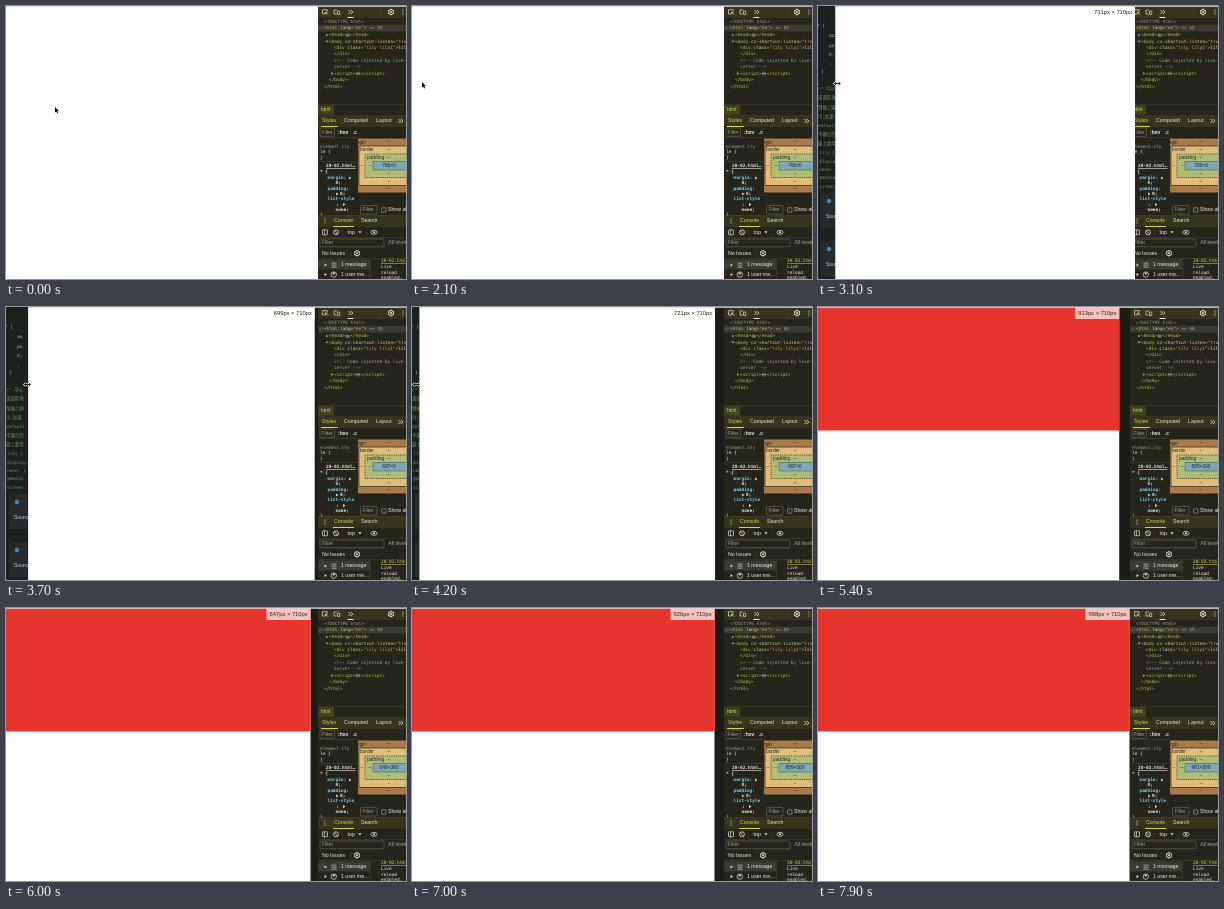
Animation of 400 by 273 pixels, one loop 8000 ms. Source, as an HTML page with a canvas:

```html
<!DOCTYPE html>
<html lang="en">
<head>
<meta charset="utf-8">
<title>Responsive resize</title>
<style>
html, body { margin: 0; width: 100%; height: 100%; overflow: hidden; background: #fff; }
canvas { display: block; width: 400px; height: 273px; }
</style>
</head>
<body>
<canvas id="stage"></canvas>
<script>
const W = 400, H = 273, LOOP = 8000, STEP = 100, SCALE = 0.41;
const canvas = document.getElementById('stage');
const ctx = canvas.getContext('2d');
const dpr = window.devicePixelRatio || 1;
canvas.width = W * dpr;
canvas.height = H * dpr;

const MONO = '"DejaVu Sans Mono", "Noto Sans CJK TC", "Noto Sans CJK", monospace';
const SANS = '"Liberation Sans", Arial, sans-serif';
const C = {
  panel: '#25251c', bar: '#34341f', line: '#46472f', box: '#65664c', row: '#3b3b31', text: '#eae9dc', dim: '#a09f8f',
  tag: '#b3c04f', attr: '#d2d58c', value: '#f0986a', prop: '#78cff0', accent: '#d2d84c'
};

// Key points: [time, value]
const PAGE_WIDTH = [[2800, 763], [3100, 731], [3500, 697], [3900, 701], [4200, 721], [4600, 768], [6000, 847], [7900, 998]];
const PAGE_RIGHT = [[2800, 312], [3100, 317], [3500, 311], [4200, 303], [4600, 304.5], [5700, 300], [6000, 304.5], [6400, 310],
  [6800, 300], [7200, 305], [7500, 302], [7900, 311.5]];
const POINTER_X = [[200, 49], [1000, 34], [2100, 10], [2700, 0]];
const POINTER_Y = [[200, 101], [1000, 90], [2100, 76], [2700, 77]];
const GRIP = [[3100, 2], [4200, -3]];
const BOX_SIZE = [[0, '766×0'], [3500, '697×0'], [4400, '760×0'], [4700, '768×300'], [5200, '805×300'],
  [5800, '846×300'], [6500, '889×300'], [7100, '935×300'], [7600, '981×300']];

function at(keys, t) {
  if (t <= keys[0][0]) return keys[0][1];
  for (let i = 1; i < keys.length; i++) {
    const [t0, a] = keys[i - 1], [t1, b] = keys[i];
    if (t <= t1) return a + (b - a) * (t - t0) / (t1 - t0);
  }
  return keys[keys.length - 1][1];
}

function latest(keys, t) {
  return keys.filter(k => k[0] <= t).pop()[1];
}

function rect(x, y, w, h, color) {
  ctx.fillStyle = color;
  ctx.fillRect(x, y, w, h);
}

function frame(x, y, w, h, color, r = 1) {
  ctx.strokeStyle = color;
  ctx.lineWidth = 0.7;
  ctx.beginPath();
  ctx.roundRect(x, y, w, h, r);
  ctx.stroke();
}

function path(points, color, width = 0.8) {
  ctx.strokeStyle = color;
  ctx.lineWidth = width;
  ctx.beginPath();
  points.forEach(([x, y], i) => i ? ctx.lineTo(x, y) : ctx.moveTo(x, y));
  ctx.stroke();
}

function ring(x, y, r, color, width = 0.8) {
  ctx.strokeStyle = color;
  ctx.lineWidth = width;
  ctx.beginPath();
  ctx.arc(x, y, r, 0, 7);
  ctx.stroke();
}

function dot(x, y, r, color) {
  ctx.fillStyle = color;
  ctx.beginPath();
  ctx.arc(x, y, r, 0, 7);
  ctx.fill();
}

// Vertically centred text; returns the x where it ends.
function write(str, x, y, color, font, align = 'left') {
  ctx.font = font;
  ctx.textAlign = align;
  ctx.textBaseline = 'middle';
  ctx.fillStyle = color;
  ctx.fillText(str, x, y);
  return x + ctx.measureText(str).width;
}

const ui = (str, x, y, color = C.text, size = 5.2, align) => write(str, x, y, color, size + 'px ' + SANS, align);
const code = (str, x, y, color = C.text) => write(str, x, y, color, '4.45px ' + MONO);
const bold = (str, x, y, color = C.text) => write(str, x, y, color, 'bold 4.45px ' + MONO);

function codeRow(x, y, ...parts) {
  for (const [str, color] of parts) x = code(str, x, y, color);
  return x;
}

// A collapsed element with a small pill between its tags.
function collapsed(name, x, y) {
  arrow(x - 2, y);
  const end = code(`<${name}>`, x, y, C.tag);
  ctx.fillStyle = '#55564a';
  ctx.beginPath();
  ctx.roundRect(end + 0.3, y - 1.7, 4.6, 3.6, 1.2);
  ctx.fill();
  for (const d of [1.4, 2.6, 3.8]) dot(end + d, y, 0.4, C.text);
  code(`</${name}>`, end + 5.3, y, C.tag);
}

function arrow(x, y, down, color = C.dim) {
  ctx.fillStyle = color;
  ctx.beginPath();
  if (down) { ctx.moveTo(x - 1.5, y - 1); ctx.lineTo(x + 1.5, y - 1); ctx.lineTo(x, y + 1.3); }
  else { ctx.moveTo(x - 0.9, y - 1.6); ctx.lineTo(x + 1.3, y); ctx.lineTo(x - 0.9, y + 1.6); }
  ctx.fill();
}

function gear(x, y) {
  ring(x, y, 2.5, C.text, 0.9);
  dot(x, y, 1, C.text);
  for (let i = 0; i < 6; i++) {
    const a = (i + 0.5) * Math.PI / 3, c = Math.cos(a), s = Math.sin(a);
    path([[x + c * 2.5, y + s * 2.5], [x + c * 3.3, y + s * 3.3]], C.text, 1);
  }
}

function chevrons(x, y) {
  for (const d of [0, 2.4]) path([[x + d, y - 2], [x + d + 2, y], [x + d, y + 2]], C.text);
}

function dots(x, y) {
  for (const d of [-2, 0, 2]) dot(x, y + d, 0.6, C.text);
}

function drawEditor() {
  rect(0, 0, 40, H, '#1b211f');
  const plain = '#9eb3a7', note = '#659350';
  code('r {', -1, 20, plain);
  ['ma', 'po', '0;', ':'].forEach((s, i) => code(s, 11, 30 + i * 9.5, plain));
  code('}', 3, 66, plain);
  ['/* 可以', '畫面區塊', '螢機上顯', '示,如果', 'default', '不顯示的', '最上要用']
    .forEach((s, i) => code(s, 0, 83 + i * 9.2, note));
  ['lily j', 'display:', 'none; }', '@media', 'screen'].forEach((s, i) => code(s, 1, 147 + i * 8.4, note));
  for (const y of [187, 235]) {
    rect(3, y, 40, 35, '#252b2c');
    dot(11, y + 8, 2.2, '#3c87c8');
    ui('Source', 8, y + 24, '#c0c8c8', 5);
  }
}

function drawElements() {
  rect(312, 0, 88, 12, C.bar);
  path([[319, 8], [316.5, 8], [316.5, 3.7], [321.3, 3.7], [321.3, 5]], C.text, 0.7);
  path([[322.3, 8.8], [319.5, 6], [319.5, 8.2]], C.text, 0.7);
  path([[319.5, 6], [321.7, 6]], C.text, 0.7);
  path([[331, 4], [328, 4], [328, 8], [330.5, 8]], C.text, 0.7);
  frame(331.5, 5, 2.2, 3.5, C.text, 0.3);
  chevrons(342.5, 6);
  rect(341.5, 11, 6, 1, C.text);
  rect(375.5, 2, 0.6, 8, C.line);
  gear(385, 6);
  dots(397, 6);

  rect(312, 18.8, 88, 6.6, C.row);
  const { tag, attr, value, dim, text } = C;
  code('<!DOCTYPE html>', 318, 15.5, dim);
  for (let i = 0; i < 3; i++) dot(313.3 + i * 1.4, 22, 0.4, dim);
  codeRow(318, 22, ['<html ', tag], ['lang', attr], ['="', tag], ['en', value], ['">', tag], [' == $0', dim]);
  collapsed('head', 323, 29);
  arrow(321, 35.5, true);
  codeRow(323, 35.5, ['<body ', tag], ['cz-shortcut-listen', attr], ['="', tag], ['true', value], ['">', tag]);
  codeRow(328, 42, ['<div ', tag], ['class', attr], ['="', tag], ['lily lily1', value], ['">', tag], ['lily', text]);
  code('</div>', 328, 48, tag);
  code('<!-- Code injected by live-', 328, 54.5, dim);
  code('server -->', 328, 61, dim);
  collapsed('script', 328, 67.5);
  code('</body>', 323, 74, tag);
  code('</html>', 318, 80.5, tag);

  rect(312, 98.5, 88, 0.6, C.line);
  rect(312, 99.3, 16, 9.4, '#414321');
  ui('html', 315, 104, C.accent, 5);
}

function drawBoxModel(size) {
  rect(352, 131, 48, 78, C.panel);
  rect(352, 132.5, 48, 54, '#a97b4b');
  rect(353, 140, 47, 39.5, '#e1bd79');
  rect(359, 148, 41, 23.5, '#b0bd76');
  rect(367, 155.5, 33, 8.5, '#7da8b6');
  const ink = '#25251d';
  ctx.setLineDash([1.2, 1]);
  frame(359, 148, 46, 23.5, ink, 0);
  ctx.setLineDash([]);
  frame(353, 140, 52, 39.5, ink, 0);
  frame(367, 155.5, 38, 8.5, '#4f6b72', 0);
  ui('rgin', 352, 136.3, ink, 4.8);
  ui('border', 354, 144, ink, 4.8);
  ui('padding', 361, 152, ink, 4.8);
  for (const y of [136, 144, 152, 167.7, 175.5, 183]) ui('–', 383, y, ink, 5, 'center');
  for (const x of [356, 364]) ui('–', x, 160, ink, 5, 'center');
  ui(size, 383, 160, ink, 4.8, 'center');
  frame(354.5, 199.5, 16.5, 8.5, C.box);
  ui('Filter', 356.5, 204, C.dim, 5);
  frame(375.5, 201.8, 4.4, 4.4, C.dim, 0.6);
  ui('Show all', 382, 204);
}

function drawStyles(size) {
  rect(312, 109, 88, 12, C.bar);
  ui('Styles', 316, 115, C.accent);
  ui('Computed', 338, 115);
  ui('Layout', 370, 115);
  chevrons(392.5, 115);
  rect(315, 120, 17, 1, C.accent);
  frame(314, 122, 14.5, 8.3, C.box);
  ui('Filter', 315.5, 126.4, C.dim, 5);
  write(':hov', 332, 126.4, C.text, 'bold 4.9px ' + SANS);
  write('.c', 347, 126.4, C.text, 'bold 4.9px ' + SANS);
  rect(312, 131.2, 88, 0.6, C.line);

  code('element.sty', 314, 140.5, C.dim);
  code('le {', 314, 146.3);
  code('}', 314, 152);
  rect(312, 155.5, 40, 0.5, C.line);
  bold('20-02.html…', 320, 160);
  rect(320, 162.2, 29.5, 0.6, C.text);
  bold('* {', 314, 166);
  bold('margin:', 321.5, 172, C.prop);
  arrow(344, 172, false, C.text);
  bold('0;', 329.5, 177.3);
  bold('padding:', 321.5, 183, C.prop);
  arrow(331, 188, false, C.text);
  bold('0;', 334, 188);
  bold('list-style', 321.5, 193.3, C.prop);
  bold(':', 330, 198.6);
  arrow(338, 198.6, false, C.text);
  bold('none;', 329.5, 204);
  code('}', 314, 209);
  drawBoxModel(size);
}

function drawConsole() {
  rect(312, 209.5, 88, 11.5, C.bar);
  rect(312, 209.2, 88, 0.6, C.line);
  dots(319, 215);
  ui('Console', 328, 215, C.accent);
  ui('Search', 355, 215);
  rect(327, 220, 21, 1, C.accent);

  frame(316.5, 223.8, 5, 5, C.text, 0.5);
  rect(318.2, 224, 0.6, 5, C.text);
  ring(330, 226.3, 2.5, C.text);
  path([[328.3, 224.6], [331.7, 228]], C.text);
  rect(336.5, 223, 0.5, 7, C.line);
  ui('top', 341.5, 226.3, C.text, 5.4);
  arrow(354, 226.3, true, C.text);
  rect(360, 223, 0.5, 7, C.line);
  ctx.strokeStyle = C.text;
  ctx.lineWidth = 0.7;
  ctx.beginPath();
  ctx.ellipse(368, 226.3, 3, 2, 0, 0, 7);
  ctx.stroke();
  dot(368, 226.3, 1, C.text);
  rect(312, 231.5, 88, 0.5, C.line);

  frame(314, 233, 64, 7.8, C.box);
  ui('Filter', 316, 237, C.dim, 5);
  ui('All levels', 382.3, 237, C.dim);
  ui('No Issues', 316, 247.3);
  rect(344.5, 244, 0.5, 7, C.line);
  gear(351, 247.3);
  rect(312, 252.5, 88, 0.6, C.line);

  rect(312, 253.5, 52, 10, C.row);
  arrow(319.5, 259, false, C.text);
  for (const d of [-2, 0, 2]) rect(325.5, 258.8 + d, 5, 0.6, C.text);
  ui('1 message', 335, 259);
  arrow(319.5, 268.6, false, C.text);
  dot(327.8, 267.5, 1.1, C.text);
  ring(327.8, 268.6, 2.7, C.text, 0.7);
  ui('1 user me…', 335, 268.6);
  rect(364, 253, 0.6, 20, C.line);
  code('20-02.html', 375, 255.3, C.accent);
  rect(375, 257.4, 25, 0.5, C.accent);
  ['Live', 'reload', 'enabled.'].forEach((s, i) => code(s, 375, 261 + i * 5.6));
}

function drawPage(left, right, wide) {
  rect(left, 0, right - left, H, '#fefdfe');
  if (wide) rect(left, 0, right - left, 123.5, '#e6352e');
}

function drawLabel(right, width) {
  rect(right - 44, 0, 44, 12, 'rgba(255,255,255,.7)');
  ui(Math.round(width) + 'px × 710px', right - 41, 6.2, '#222', 5.8);
}

function drawPointer(x, y) {
  ctx.beginPath();
  [[0, 0], [0, 5.6], [1.3, 4.5], [2.2, 6.5], [3.1, 6.1], [2.2, 4.2], [3.9, 4]]
    .forEach(([dx, dy]) => ctx.lineTo(x + dx, y + dy));
  ctx.closePath();
  ctx.strokeStyle = '#fff';
  ctx.lineWidth = 1;
  ctx.stroke();
  ctx.fillStyle = '#000';
  ctx.fill();
}

function drawResize(x, y) {
  for (const [color, w] of [['#fff', 2], ['#000', 0.9]]) {
    path([[x - 2.6, y], [x + 2.6, y]], color, w);
    for (const s of [-1, 1]) path([[x + s * 1.4, y - 1.5], [x + s * 3, y], [x + s * 1.4, y + 1.5]], color, w);
  }
}

function draw(t) {
  ctx.setTransform(dpr, 0, 0, dpr, 0, 0);
  const dragging = t >= 2800;
  const width = at(PAGE_WIDTH, t), right = at(PAGE_RIGHT, t);
  const edge = right - width * SCALE;
  const left = dragging ? Math.max(0, edge) : 0;

  drawEditor();
  rect(295, 0, 105, H, '#1d1d17');
  rect(312, 0, 88, H, C.panel);
  drawElements();
  drawStyles(latest(BOX_SIZE, t));
  drawConsole();
  drawPage(left, right, t >= 4600);
  if (dragging) drawLabel(right, width);
  rect(left, 0, W - left, 0.8, '#d6d5d4');
  if (dragging) drawResize(edge + at(GRIP, t), 77.5);
  else drawPointer(at(POINTER_X, t), at(POINTER_Y, t));
}

function tick(now) {
  draw(Math.floor((now % LOOP) / STEP) * STEP);
  requestAnimationFrame(tick);
}
requestAnimationFrame(tick);
</script>
</body>
</html>
```
